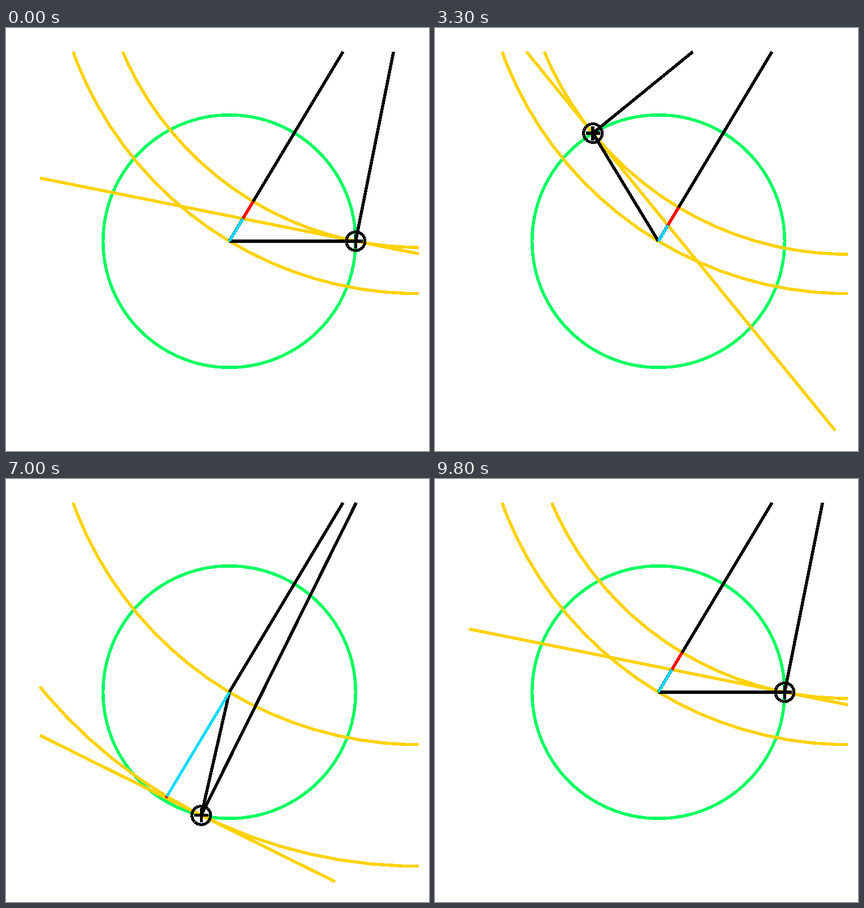
An HTML page for the animation above (9900 ms loop, 748x748 px).

```html
<!DOCTYPE html>
<html lang="en">
<head>
<meta charset="utf-8">
<title>Circular and plane wavefronts</title>
<style>
  html, body { margin: 0; width: 100%; height: 100%; overflow: hidden; background: #fff; }
  svg { display: block; width: 100vw; height: 100vh; }
  path { fill: none; stroke-width: 5.5; shape-rendering: crispEdges; }
  .ring { stroke: #00ff60; }
  .wave { stroke: #ffd200; }
  .ray { stroke: #000; }
  .plane { stroke: #00d9ff; stroke-width: 5; }
  .error { stroke: #f00; }
  .mark { stroke: #000; stroke-width: 5.2; }
</style>
</head>
<body>
<svg viewBox="0 0 748 748">
  <path class="ring" id="ring"/>
  <path class="wave" id="fixed"/>
  <path class="wave" id="arc"/>
  <path class="wave" id="tangent"/>
  <path class="ray" id="axis"/>
  <path class="ray" id="radius"/>
  <path class="ray" id="sight"/>
  <path class="plane" id="plane"/>
  <path class="error" id="error"/>
  <path class="mark" id="dial"/>
  <path class="ray" id="cross"/>
</svg>
<script>
const STEPS = 98, FRAME = 100, LOOP = 9900;
const UNIT = 670 / 3, LIMIT = 1.5, CX = 395, CY = 377;
const ORIGIN = [0, 0], SOURCE = [1.5, 2.5];
const dist = Math.hypot(...SOURCE);
const u = SOURCE.map(v => v / dist);

const draw = (id, d) => document.getElementById(id).setAttribute('d', d);
const px = ([x, y]) => `${(CX + x * UNIT).toFixed(2)} ${(CY - y * UNIT).toFixed(2)}`;
const polar = (c, r, a) => [c[0] + r * Math.cos(a), c[1] + r * Math.sin(a)];
const along = s => [u[0] * s, u[1] * s];

// Part of segment a-b inside the plot square, or null.
function clip(a, b) {
  let t0 = 0, t1 = 1;
  const d = [b[0] - a[0], b[1] - a[1]];
  for (const i of [0, 1]) {
    if (Math.abs(d[i]) < 1e-9) {
      if (Math.abs(a[i]) > LIMIT) return null;
      continue;
    }
    const lo = (-LIMIT - a[i]) / d[i], hi = (LIMIT - a[i]) / d[i];
    t0 = Math.max(t0, Math.min(lo, hi));
    t1 = Math.min(t1, Math.max(lo, hi));
  }
  if (t0 >= t1) return null;
  return [t0, t1].map(t => [a[0] + d[0] * t, a[1] + d[1] * t]);
}

function polyline(points) {
  let d = '', last = '';
  for (let i = 1; i < points.length; i++) {
    const part = clip(points[i - 1], points[i]);
    if (!part) continue;
    const [from, to] = part.map(px);
    d += (from === last ? '' : 'M' + from) + 'L' + to;
    last = to;
  }
  return d;
}

const line = (a, b) => polyline([a, b]);
const circle = (c, r) =>
  polyline(Array.from({ length: STEPS + 1 }, (_, i) => polar(c, r, 2 * Math.PI * i / STEPS)));

// Ring of separate straight pieces around p.
function dial(p, r, n) {
  let d = '';
  for (let i = 0; i < n; i++) {
    d += 'M' + px(polar(p, r, 2 * Math.PI * i / n)) + 'L' + px(polar(p, r, 2 * Math.PI * (i + 1) / n));
  }
  return d;
}

function render(step) {
  const p = polar(ORIGIN, 1, 2 * Math.PI * step / STEPS);
  const n = [SOURCE[0] - p[0], SOURCE[1] - p[1]];
  const r = Math.hypot(...n);
  const flat = along((p[0] * n[0] + p[1] * n[1]) / (u[0] * n[0] + u[1] * n[1]));
  const curved = along(dist - r);
  const far = s => [p[0] - s * n[1], p[1] + s * n[0]];
  const arm = 12.5 / UNIT;

  draw('arc', circle(SOURCE, r));
  draw('tangent', line(far(-4), far(4)));
  draw('radius', line(ORIGIN, p));
  draw('sight', line(p, SOURCE));
  draw('plane', line(ORIGIN, flat));
  draw('error', line(flat, curved));
  draw('dial', dial(p, 16.6 / UNIT, 24));
  draw('cross', `M${px([p[0] - arm, p[1]])}L${px([p[0] + arm, p[1]])}` +
                `M${px([p[0], p[1] - arm])}L${px([p[0], p[1] + arm])}`);
}

draw('ring', circle(ORIGIN, 1) + 'Z');
draw('fixed', circle(SOURCE, dist));
draw('axis', line(ORIGIN, SOURCE));

let shown = -1;
const start = performance.now();
function tick() {
  const step = Math.floor((performance.now() - start) % LOOP / FRAME);
  if (step !== shown) render(shown = step);
  requestAnimationFrame(tick);
}
tick();
</script>
</body>
</html>
```
